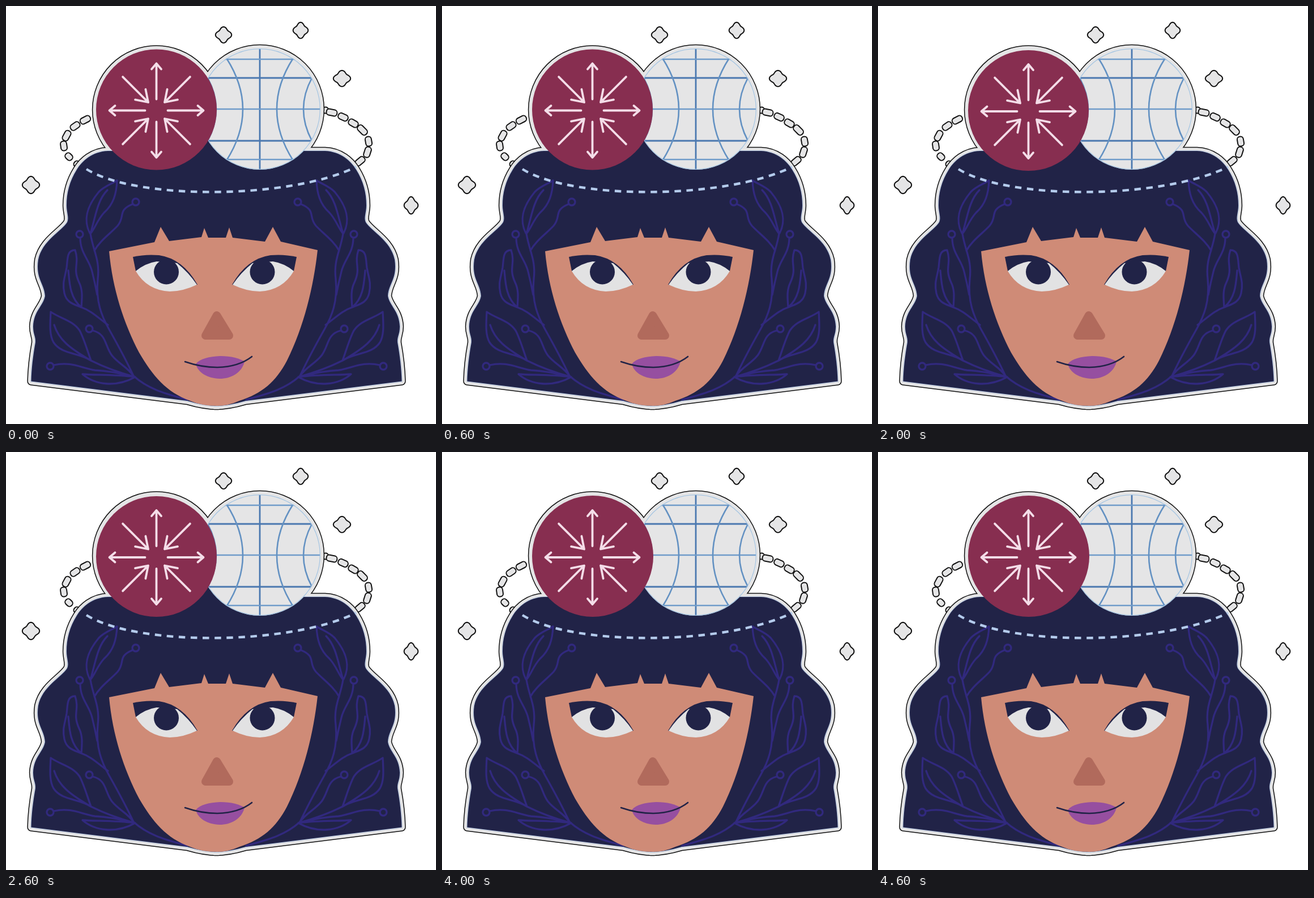
Animation, 759 px wide and 738 px high, one loop 5000 ms. Source, as an HTML page with a canvas:

```html
<!DOCTYPE html>
<html lang="en">
<head>
<meta charset="utf-8">
<title>Portrait</title>
<style>
html, body { margin: 0; width: 100%; height: 100%; overflow: hidden; background: #fff; }
canvas { display: block; }
</style>
</head>
<body>
<canvas id="stage" width="759" height="738"></canvas>
<script>
const ctx = document.getElementById('stage').getContext('2d');
const W = 759, H = 738, HOLD = 1000;
const NAVY = '#212347', GREY = '#e5e5e6', SKIN = '#cf8b77', VINE = '#31297e', BLUE = '#4b78b0';

// Disc position, radius and arrow height for each beat
const BEATS = [
  { x: 265.5, y: 183, r: 106.5, ay: 184.5 },
  { x: 265.5, y: 183, r: 106.5, ay: 184.5 },
  { x: 265.5, y: 184.5, r: 106.5, ay: 186 },
  { x: 264.5, y: 182.5, r: 105.5, ay: 184 },
  { x: 266, y: 184, r: 107, ay: 186 }
];
const GLOBE = { x: 448, y: 182, r: 107 };

const SPARKS = [[384, 51, 15, 15], [520, 43, 14, 15], [593, 128, 16, 15], [44, 316, 16, 16], [715, 352, 13, 16]];

// x, y, angle in degrees, length
const BEADS = [
  [140, 201, -28, 19], [122, 212, -35, 18], [107, 229, -62, 19], [102, 247, 82, 17],
  [111, 266, 45, 14], [127, 281, 45, 16],
  [564, 184, 10, 10], [575, 188, 12, 19], [595, 196, 25, 18], [613, 207, 30, 18], [629, 219, 45, 20],
  [640, 239, 80, 17], [638, 258, -72, 19], [625, 274, -40, 19]
];

// The halves overlap at the middle and are painted one after the other
const hair = halves('M375 235H300V256H180C152 257 134 274 125 289C112 310 107 330 107 352' +
  'C107 365 112 374 108 382C98 398 64 414 57 448C52 482 68 490 69 512C66 530 49 538 48 566' +
  'C48 580 53 584 52 594C48 616 45 640 44.5 662.5L320 697Q350 706 375 706Z', 743);

const face = new Path2D('M182 433L262 417L273 390L288 415L345 408L350 392L357 409H388L394 391L400 409' +
  'L457 416L471 390L485 416L550 431C543 495 526 566 496 626C476 664 452 684 412 697' +
  'Q392 706 373 706Q345 706 325 697C283 682 259 653 235 612C208 560 188 500 182 433Z');

const vines = halves([
  'M223 350C196 361 211 372 197 388C184 402 166 414 156 432',
  'M148 401C133 372 149 346 164 328C174 318 185 315 196 308C195 331 190 350 173 365C161 378 158 391 149 402',
  'M179 325C161 343 158 372 149 402C154 433 166 448 162 482C158 522 169 548 182 571C200 603 212 625 225 653C254 679 288 686 320 695',
  'M131 409C131 437 147 447 152 469C156 485 158 494 161 510',
  'M122 431C107 431 109 447 107 462C104 480 99 488 103 507C107 525 122 527 133 532C134 516 136 502 129 488C117 462 130 456 122 431Z',
  'M110 467C112 489 113 516 133 532C151 538 163 551 180 563',
  'M79 540C78 560 76 580 84 594C99 616 127 611 150 626C143 607 138 588 130 573C118 555 96 552 79 540Z',
  'M85 563C93 589 112 604 150 626C178 640 202 648 228 655',
  'M153 573C178 579 174 600 187 617C199 632 214 637 225 653',
  'M84 634C115 627 132 639 157 643C181 644 201 649 228 655',
  'M228 655C190 650 160 652 135 650C157 669 194 674 228 655',
  dot(229, 346), dot(130, 403), dot(147, 570), dot(78, 636)
].join(''), 744);

const belt = new Path2D('M142 288C230 343 500 342 618 284');

// A path and its reflection, where x and its image add up to sum
function halves(d, sum) {
  const left = new Path2D(d), right = new Path2D();
  right.addPath(left, new DOMMatrix([-1, 0, 0, 1, sum, 0]));
  return [left, right];
}

function dot(x, y) {
  return `M${x - 6} ${y}a6 6 0 1 0 12 0a6 6 0 1 0 -12 0`;
}

function disc(x, y, r) {
  const p = new Path2D();
  p.arc(x, y, r, 0, Math.PI * 2);
  return p;
}

function fill(p, color) {
  ctx.fillStyle = color;
  ctx.fill(p);
}

function stroke(p, color, width) {
  ctx.strokeStyle = color;
  ctx.lineWidth = width;
  ctx.stroke(p);
}

function spark(x, y, rx, ry) {
  const p = new Path2D();
  for (let i = 0; i < 48; i++) {
    const a = i / 48 * Math.PI * 2, k = 0.83 + 0.12 * Math.cos(4 * a);
    p.lineTo(x + rx * k * Math.cos(a), y + ry * k * Math.sin(a));
  }
  p.closePath();
  fill(p, GREY);
  stroke(p, '#111', 2);
}

function bead(x, y, deg, len) {
  ctx.save();
  ctx.translate(x, y);
  ctx.rotate(deg * Math.PI / 180);
  const p = new Path2D();
  p.roundRect(-len / 2, -5.5, len, 11, 5);
  fill(p, GREY);
  stroke(p, '#111', 2);
  ctx.restore();
}

function globe() {
  const { x, y, r } = GLOBE, ball = disc(x, y, r);
  fill(ball, GREY);
  ctx.save();
  ctx.clip(ball);
  stroke(new Path2D(`M${x} 75V290M341 127H555M341 238H555`), BLUE, 2.8);
  stroke(new Path2D('M341 182H555M341 94H555M341 271H555'), '#6f9bc9', 2.4);
  for (const p of halves('M389 92Q447 182 389 273M356 127Q386 182 356 238', x * 2)) stroke(p, '#6391c2', 2.6);
  stroke(ball, '#a5c5e2', 2.5);
  ctx.restore();
}

function arrows(x, y) {
  const out = new Path2D('M20 0H83M73 -8.5L83 0L73 8.5');
  const inward = new Path2D('M84 0H20.5M40 -13L20.5 0L40 13');
  ctx.save();
  ctx.translate(x, y);
  ctx.lineCap = 'round';
  for (let i = 0; i < 8; i++) {
    stroke(i % 2 ? inward : out, '#f4dde8', 3.8);
    ctx.rotate(Math.PI / 4);
  }
  ctx.restore();
}

function eye(pupilX, flip) {
  ctx.save();
  if (flip) ctx.transform(-1, 0, 0, 1, 737, 0);
  fill(new Path2D('M224 443Q246 438 270 440Q312 446 338 492L290 498L229 468Z'), NAVY);
  fill(new Path2D('M229 468Q246 454 266 451L302 454Q322 470 337 492Q312 504 289 504Q249 502 229 468Z'), '#e2e2e3');
  ctx.restore();
  fill(disc(pupilX, 469.5, 22), NAVY);
}

function head() {
  hair.forEach(p => fill(p, NAVY));
  ctx.lineCap = ctx.lineJoin = 'round';
  vines.forEach(p => stroke(p, VINE, 3.3));
  fill(face, SKIN);
  eye(283, false);
  eye(452.5, true);

  const nose = new Path2D('M372 546L352 582H394Z');
  fill(nose, '#b16a5c');
  stroke(nose, '#b16a5c', 14);

  fill(new Path2D('M335 632C343 622 359 619 378 618C397 618 413 622 421 628C416 648 397 658 377 658C354 657 339 647 335 632Z'), '#964fa0');
  stroke(new Path2D('M316 628Q345 638 373 638Q411 637 434 619'), NAVY, 2.6);

  ctx.lineCap = 'butt';
  ctx.setLineDash([11.5, 9.6]);
  stroke(belt, '#b4cbec', 4.4);
  ctx.setLineDash([]);
}

function draw(beat) {
  const d = BEATS[beat];
  ctx.setTransform(1, 0, 0, 1, 0, 0);
  ctx.fillStyle = '#fff';
  ctx.fillRect(0, 0, W, H);
  if (beat % 2) ctx.setTransform(-1, 0, 0, 1, 758, 0);

  SPARKS.forEach(s => spark(...s));
  BEADS.forEach(b => bead(...b));

  // Sticker border around the joined outline
  ctx.lineJoin = 'round';
  const parts = [...hair, disc(265.5, 183, 106.5), disc(GLOBE.x, GLOBE.y, GLOBE.r)];
  parts.forEach(p => stroke(p, '#111', 14.4));
  parts.forEach(p => stroke(p, GREY, 11.4));
  hair.forEach(p => stroke(p, '#a9bad6', 2));

  head();
  globe();
  fill(disc(d.x, d.y, d.r), '#872e50');
  arrows(265.5, d.ay);
}

let start = null, shown = -1;
function tick(now) {
  if (start === null) start = now;
  const beat = Math.floor((now - start) / HOLD) % BEATS.length;
  if (beat !== shown) draw(shown = beat);
  requestAnimationFrame(tick);
}
requestAnimationFrame(tick);
</script>
</body>
</html>
```
